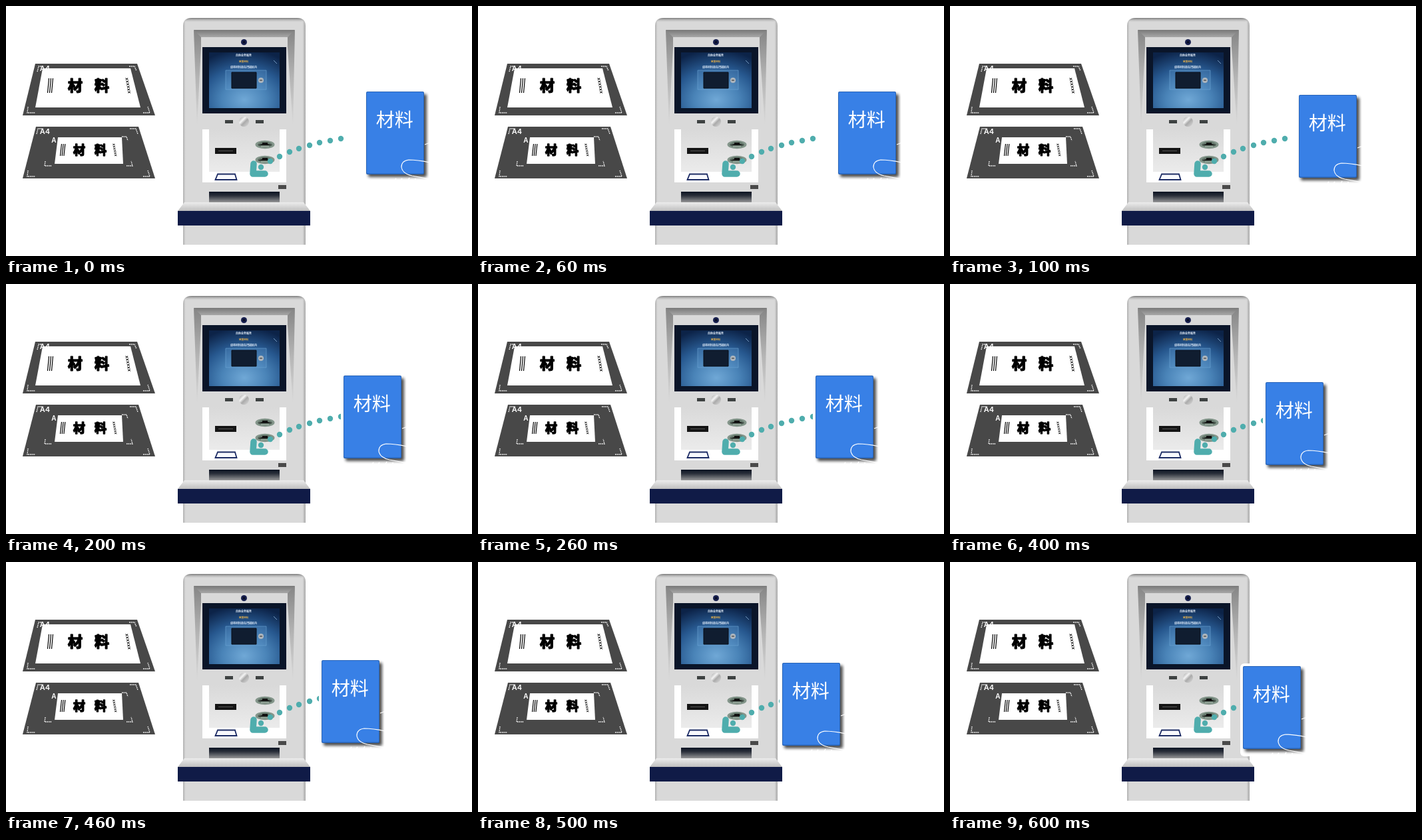
Animation, 700 px wide and 377 px high, one loop 0.7 s. Source, as an HTML page:

```html
<!DOCTYPE html>
<html lang="zh">
<head>
<meta charset="utf-8">
<style>
  html, body { margin: 0; width: 100%; height: 100%; overflow: hidden; background: #fff; }
  svg { display: block; width: 700px; height: 377px; }
  text { font-family: "Noto Sans CJK SC", "Noto Sans CJK", sans-serif; text-anchor: middle; }
  .latin { font-family: Inter, Lato, sans-serif; }
  .marks { fill: none; stroke: #fff; stroke-width: 1.3; stroke-dasharray: 1.6 1; }
</style>
</head>
<body>
<svg viewBox="0 0 700 377">
  <defs>
    <linearGradient id="body">
      <stop offset="0" stop-color="#b0b0b0"/><stop offset=".02" stop-color="#d9d9d9"/>
      <stop offset=".975" stop-color="#d9d9d9"/><stop offset="1" stop-color="#a8a8a8"/>
    </linearGradient>
    <linearGradient id="cap" x2="0" y2="1">
      <stop offset="0" stop-color="#777"/><stop offset=".6" stop-color="#d9d9d9" stop-opacity="0"/>
    </linearGradient>
    <linearGradient id="recess" x2="0" y2="1">
      <stop offset="0" stop-color="#787878"/><stop offset="1" stop-color="#a8a8a8"/>
    </linearGradient>
    <linearGradient id="side" x2="0" y2="1">
      <stop offset="0" stop-color="#858585"/><stop offset=".5" stop-color="#b5b5b5"/>
      <stop offset="1" stop-color="#d9d9d9"/>
    </linearGradient>
    <radialGradient id="screen" cx=".5" cy=".85" r=".9">
      <stop offset="0" stop-color="#70a8d6"/><stop offset=".35" stop-color="#4a84b8"/>
      <stop offset=".65" stop-color="#27588f"/><stop offset="1" stop-color="#0c2348"/>
    </radialGradient>
    <linearGradient id="wall" x2="0" y2="1">
      <stop offset="0" stop-color="#d9d9d9"/><stop offset="1" stop-color="#ebebeb"/>
    </linearGradient>
    <linearGradient id="slot" x2="0" y2="1">
      <stop offset="0" stop-color="#0b1322"/><stop offset=".35" stop-color="#2a2f3a"/>
      <stop offset="1" stop-color="#a0a0a0"/>
    </linearGradient>
    <linearGradient id="shelf" x2="0" y2="1">
      <stop offset="0" stop-color="#ececec"/><stop offset="1" stop-color="#bfbfbf"/>
    </linearGradient>
    <linearGradient id="steel" x2="1" y2="1">
      <stop offset="0" stop-color="#999"/><stop offset=".35" stop-color="#f4f4f4"/>
      <stop offset=".55" stop-color="#aaa"/><stop offset="1" stop-color="#ddd"/>
    </linearGradient>
    <filter id="blur" x="-20%" y="-20%" width="140%" height="140%">
      <feGaussianBlur stdDeviation="2.2"/>
    </filter>
    <clipPath id="cardEdge"><rect x="-4" y="-4" width="98.5" height="140"/></clipPath>
    <g id="reader">
      <ellipse rx="14.5" ry="6.2" fill="#84968b"/>
      <ellipse rx="11" ry="4.4" fill="#64776b"/>
      <path d="M-11 1L-4 -1V-3H4V-1L11 1Z" fill="#111"/>
      <path d="M-6 3H6" stroke="#bccabf"/>
    </g>
  </defs>

  <!-- Sheets -->
  <path d="M44 87H197L224 165H25Z" fill="#484848"/>
  <text class="latin" x="58.5" y="98" font-size="11" font-weight="600" fill="#fff">A4</text>
  <path class="marks" d="M47 99L49 91H55M185 91H193L196 98M33 152L32 161H44M206 161H216L213 152"/>
  <path d="M55 94H187L202 153H44Z" fill="#fff"/>
  <path d="M45 182H199L224 260H25Z" fill="#484848"/>
  <text class="latin" x="58.5" y="193" font-size="11" font-weight="600" fill="#fff">A4</text>
  <text class="latin" x="72" y="206" font-size="10" font-weight="600" fill="#fff">A</text>
  <path class="marks" d="M46 193L48 185H56M186 185H195L198 193M33 248L32 257H44M206 257H216L213 248M174 197H181L183 203M59 234L58 241H69M181 241H190L188 234"/>
  <path d="M78 198H174L176 238H73Z" fill="#fff"/>
  <g id="print"></g>

  <!-- Kiosk -->
  <path d="M266 360V30Q266 18 279 18H437Q450 18 450 30V360Z" fill="url(#body)"/>
  <path d="M266 30Q266 18 279 18H437Q450 18 450 30L446 24H270Z" fill="url(#cap)"/>
  <path d="M282 36H434L427 47H289Z" fill="url(#recess)"/>
  <path d="M282 36L293 47V62L287 182ZM434 36L423 47V62L431 182Z" fill="url(#side)"/>
  <circle cx="357.5" cy="54.5" r="4.5" fill="#18204f"/>
  <circle cx="357.5" cy="54.5" r="2" fill="#080d26"/>
  <path d="M295 62H421V162H295Z" fill="#0a1529"/>
  <path d="M305 70H411V154H305Z" fill="url(#screen)"/>
  <path d="M330 97H391V126H330Z" fill="#5c94c9" fill-opacity=".3" stroke="#6ea5d5" stroke-width=".6"/>
  <path d="M339 100H376V124H339Z" fill="#101d30" stroke="#060c16"/>
  <circle cx="383" cy="112" r="4" fill="#aeb6bd"/>
  <path d="M381 112H385" stroke="#555" stroke-width="1.5"/>
  <g fill="#e4eefa" font-weight="700">
    <text x="357" y="75.5" font-size="4">自助业务服务</text>
    <text x="357" y="85" font-size="3.5" fill="#f0b64a">放置材料</text>
    <text x="357" y="93.5" font-size="4">请将材料放在扫描区内</text>
  </g>
  <path d="M402 82L407 87" stroke="#7197bf"/>
  <path d="M329 172H341V177H329ZM375 172H387V177H375Z" fill="#3e4242"/>
  <circle cx="357.5" cy="174.5" r="7.5" fill="url(#steel)"/>
  <path d="M295 186H421V266H295Z" fill="#fff"/>
  <path d="M305 186H411V250H305Z" fill="url(#wall)"/>
  <path d="M314 214H346V223H314Z" fill="#151515"/>
  <path d="M319 218.5H341" stroke="#555"/>
  <use href="#reader" x="389" y="209"/>
  <use href="#reader" x="389" y="232"/>
  <path d="M318 253.5H344L346.5 262H314.5Z" fill="#f7f8fc" stroke="#1b2a63" stroke-width="1.8"/>
  <path d="M409 270H421V276H409Z" fill="#4a4a4a"/>
  <path d="M305 280H411V297H305Z" fill="url(#slot)"/>
  <path d="M268 296H447L457 309H258Z" fill="url(#shelf)"/>
  <path d="M258 309H457V331H258Z" fill="#101b47"/>

  <g id="dots" fill="#4fadad"></g>
  <path d="M372 238L371 253H389" fill="none" stroke="#4fadad" stroke-width="9.5" stroke-linecap="round" stroke-linejoin="round"/>

  <!-- Held card -->
  <g id="card">
    <rect x="-4" y="-4" width="97" height="140" rx="6" fill="#fff"/>
    <g clip-path="url(#cardEdge)">
      <rect x="3" y="4" width="88" height="125" rx="2" fill="#000" opacity=".7" filter="url(#blur)"/>
      <rect width="87" height="125" rx="2" fill="#2864b8"/>
      <rect x="1" y="1" width="85" height="122.5" rx="1.5" fill="#3880e6"/>
      <path d="M96 107C82 104 72 103 64 103C56 104 53 108 53 114C54 121 60 125 69 127L96 132M88 80L96 77" fill="none" stroke="#fff" stroke-width="1.2"/>
      <path d="M43 134L45 131M52 134L54 131M63 134L65 130M74 134V131" stroke="#fff" stroke-width="1.5"/>
    </g>
    <text x="42.7" y="52.7" font-size="28" fill="#fff">材料</text>
  </g>
</svg>
<script>
  const $ = id => document.getElementById(id);

  // Title, ruled lines and serial on a sheet that widens towards the viewer
  function print(y, size, titles, lineX, gap, serialX) {
    const half = size * .5;
    const title = [..."材料"].map((c, i) =>
      `<text x="${titles[i]}" y="${y + size * .37}" font-size="${size}" font-weight="900"
        stroke="#000" stroke-width="1.5" stroke-linejoin="round">${c}</text>`).join("");
    const rules = [0, 1, 2].map(i =>
      `M${lineX + i * gap + 1} ${y - half}L${lineX + i * gap - 1} ${y + half}`).join("");
    return title + `<path d="${rules}" stroke="#000" stroke-width="1.2"/>
      <text class="latin" transform="translate(${serialX} ${y}) skewX(10) rotate(-90)"
        y="${size * .1}" font-size="${size * .32}" font-weight="600">xxxxxx</text>`;
  }
  $("print").innerHTML = print(120, 22, [104, 144], 63.5, 3, 183) +
                         print(217, 18, [110, 142], 82.5, 2.7, 163);

  const trail = [[503, 200], [487, 203], [471, 206], [456, 210], [440, 215],
                 [426, 220], [411, 227], [397, 234], [383, 243]];
  $("dots").innerHTML = trail.map(([x, y]) => `<circle cx="${x}" cy="${y}" r="4.2"/>`).join("");

  // The card moves in seven held steps
  function draw() {
    const step = Math.floor(performance.now() % 700 / 100);
    const x = Math.round(541 - step * 16.85), y = Math.round(129 + step * 4.67);
    $("card").setAttribute("transform", `translate(${x} ${y})`);
    requestAnimationFrame(draw);
  }
  draw();
</script>
</body>
</html>
```
